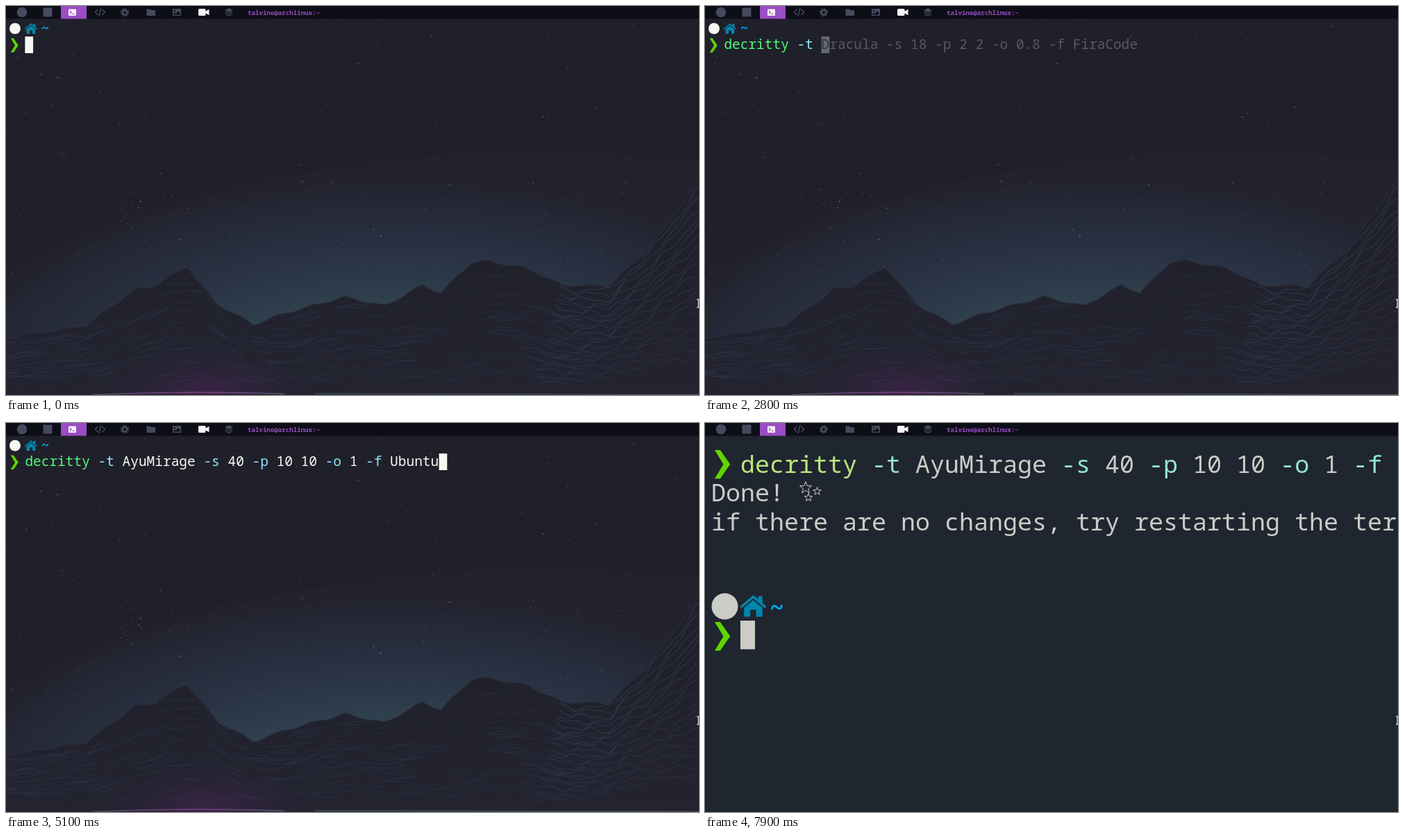
Write an HTML page with a canvas that moves like this. It is 998 by 561 pixels and loops after 8 s.

```html
<!DOCTYPE html>
<html lang="en">
<head>
<meta charset="utf-8">
<title>Terminal theme</title>
<style>
  html, body { margin: 0; width: 100%; height: 100%; overflow: hidden; background: #20202a; }
  canvas, svg { position: absolute; left: 0; top: 0; width: 998px; height: 561px; }
  text { white-space: pre; }
</style>
</head>
<body>
<canvas id="sky" width="998" height="561"></canvas>
<svg viewBox="0 0 998 561">
  <defs>
    <path id="chevron" d="M0 0H3.9L11 10.2L3.9 20.4H0L6.2 10.2Z" fill="#5fd700"/>
    <path id="house" d="M0 8.3L9 .6L12.6 3.6V1.3H15.3V5.9L18 8.3L17 9.5L9 2.8L1 9.5ZM2.7 9.3L9 4L15.3 9.3V15.4H11V10.6H7V15.4H2.7Z" fill="#0087af"/>
  </defs>
  <g id="term"></g>
  <rect width="998" height="18.5" fill="#0d0e17"/>
  <rect x="79" width="37" height="18.5" fill="#9a4dc4"/>
  <g fill="#454b5d">
    <circle cx="23" cy="9" r="7.3"/>
    <rect x="53.5" y="2.5" width="13" height="13"/>
    <path d="M132.5 5L128.500 9L132.500 13M138.500 5L142.500 9L138.500 13M137 3L134 15" fill="none" stroke="#454b5d" stroke-width="1.5"/>
    <g fill="none" stroke="#454b5d">
      <circle cx="171" cy="9.2" r="3.3" stroke-width="2.6"/>
      <circle cx="171" cy="9.2" r="5.2" stroke-width="1.8" stroke-dasharray="2.1 1.984"/>
    </g>
    <path d="M203 4.5H207.5L209 6H215V14H202.5V5Z"/>
    <path fill-rule="evenodd" d="M240 4H252V14H240ZM241.5 12.5H250.5V10L248 7.500L244.500 11L243.300 9.800L241.500 11.300ZM242 6V8H244V6Z"/>
    <path d="M321 3L327 6L321 9L315 6Z"/>
    <path id="sheet" d="M315 8.7L316.7 8L321 10.2L325.3 8L327 8.7L321 11.7Z"/>
    <use href="#sheet" y="3.2"/>
  </g>
  <rect x="90" y="4.5" width="11" height="9.5" rx="1" fill="#f6f1f8"/>
  <path d="M92 7L94.2 9.2L92 11.4M95.5 11.4H98.5" fill="none" stroke="#9a4dc4" stroke-width="1.2"/>
  <path d="M278.500 4H286Q287.500 4 287.500 5.500V7.500L292.500 4.700V13.300L287.500 10.500V12.500Q287.500 14 286 14H278.500Q277 14 277 12.500V5.500Q277 4 278.500 4Z" fill="#f4f4f6"/>
  <g id="title"></g>
  <path d="M995 423Q997 423 997 425V433Q997 435 995 435M999 423Q997 423 997 425M997 433Q997 435 999 435" fill="none" stroke="#d4d4d8" stroke-width="1.3"/>
</svg>
<script>
const W = 998, H = 561, LOOP = 8000;
const g = document.getElementById('sky').getContext('2d');
const term = document.getElementById('term');
const title = document.getElementById('title');

let seed = 7;
const rand = () => (seed = (seed * 16807) % 2147483647) / 2147483647;

/* ---- wallpaper ---- */
const PEAKS = [
  [0, 478], [115, 460], [185, 408], [212, 404], [260, 375], [305, 430], [357, 459],
  [400, 443], [488, 419], [545, 432], [600, 402], [626, 413], [670, 369], [693, 367],
  [752, 378], [800, 402], [868, 403], [925, 350], [998, 250]
];

function ridge(x) {
  let i = 1;
  while (i < PEAKS.length - 1 && PEAKS[i][0] < x) i++;
  const [x0, y0] = PEAKS[i - 1], [x1, y1] = PEAKS[i];
  return y0 + (y1 - y0) * (x - x0) / (x1 - x0) + 1.5 * Math.sin(x / 8);
}

function trace(from, to, step, height) {
  const points = [];
  for (let x = from; x <= to; x += step) points.push([x, height(x)]);
  return points;
}

function stroke(color, width, points) {
  g.strokeStyle = color;
  g.lineWidth = width;
  g.beginPath();
  points.forEach(p => g.lineTo(...p));
  g.stroke();
}

// colours run evenly from the centre to the edge
function glow(x, y, rx, ry, colors) {
  const grad = g.createRadialGradient(0, 0, 0, 0, 0, 1);
  colors.forEach((color, i) => grad.addColorStop(i / (colors.length - 1), color));
  g.save();
  g.translate(x, y);
  g.scale(rx, ry);
  g.fillStyle = grad;
  g.beginPath();
  g.arc(0, 0, 1, 0, 7);
  g.fill();
  g.restore();
}

function stars(count, place, radius, alpha) {
  for (let i = 0; i < count; i++) {
    g.fillStyle = `rgba(135,138,158,${alpha * (.4 + rand() * .6)})`;
    g.beginPath();
    g.arc(...place(), radius * (.6 + rand() * .4), 0, 7);
    g.fill();
  }
}

function drawSky() {
  g.fillStyle = '#20202a';
  g.fillRect(0, 0, W, H);
  glow(760, 600, 850, 390, ['#22222d', '#22222c']);
  glow(560, 560, 700, 330, [
    'rgba(50,68,80,1)', 'rgba(49,66,78,1)', 'rgba(48,65,78,1)',
    'rgba(43,54,71,.9)', 'rgba(40,48,68,.55)', 'rgba(36,38,52,0)'
  ]);
  stars(430, () => [W * rand() ** 1.25, 20 + rand() * 400], 1, .36);
  stars(26, () => [172 + (rand() - .5) * 34, 292 + (rand() - .5) * 56], .9, .4);
  stars(30, () => [W * rand(), 40 + rand() * 300], 1.3, .55);
}

function drawHills() {
  const crest = trace(0, W, 2, ridge);
  g.save();
  g.beginPath();
  [[0, H], ...crest, [W, H]].forEach(p => g.lineTo(...p));
  const fill = g.createLinearGradient(0, 370, 0, H);
  fill.addColorStop(0, '#20212b');
  fill.addColorStop(1, '#232430');
  g.fillStyle = fill;
  g.fill();
  g.clip();
  stroke('rgba(58,62,82,.5)', 2, crest);

  // short streaks that follow the slope above them and flatten with depth
  for (let i = 0; i < 600; i++) {
    const x0 = rand() * 860 - 20, top = ridge(x0), depth = rand();
    const tilt = (ridge(x0 + 40) - ridge(x0 - 40)) / 80 * (1 - depth * .6);
    const y0 = top + 8 + depth * (535 - top), phase = rand() * 6;
    const line = trace(x0, x0 + 18 + rand() * 36, 3,
      x => y0 + tilt * (x - x0) + 1.5 * Math.sin(x / 9 + phase));
    stroke(`rgba(62,68,100,${.1 + rand() * .26})`, 1, line);
  }
  // terraces of the right-hand peak
  for (let k = 1; k < 20; k++) {
    const f = k / 20;
    const line = trace(800 - 40 * f, W + 4, 4, x =>
      ridge(x) * (1 - f) + (535 - 15 * Math.sin(x / 70)) * f +
      3 * Math.sin(x / 11 + k * 1.7) + 2 * Math.sin(x / 5 + k));
    stroke(`rgba(66,72,104,${.5 - f * .25})`, 1.2, line);
  }
  glow(290, 560, 150, 70, ['rgba(100,36,108,.38)', 'rgba(80,34,90,.18)', 'rgba(60,34,80,0)']);
  g.restore();

  const rim = g.createLinearGradient(125, 0, 405, 0);
  ['#4a4a5c', '#7d3d84', '#4b5565'].forEach((color, i) => rim.addColorStop(i / 2, color));
  stroke(rim, 1.6, trace(125, 403, 4, x => 557.3 + ((x - 280) / 85) ** 2));
  stroke('#414c5e', 1.5, [[445, 559], [W, 560.5]]);
}

/* ---- text ---- */
const MONO = "'Noto Sans Mono', 'DejaVu Sans Mono', monospace";

function face(advance) {
  g.font = `100px ${MONO}`;
  return { advance, size: advance / g.measureText('0').width * 100 };
}
const code = face(11.69), large = face(21), small = face(5.48);

const span = (s, color, bold) => `<tspan fill="${color}"${bold ? ' font-weight="700"' : ''}>${s}</tspan>`;
const text = (font, x, y, inner) =>
  `<text xml:space="preserve" x="${x}" y="${y}" font-family="${MONO}" font-size="${font.size}">${inner}</text>`;
const use = (id, x, y, scale = 1) => `<use href="#${id}" transform="translate(${x} ${y}) scale(${scale})"/>`;
const box = (x, y, w, h, color) => `<rect x="${x}" y="${y}" width="${w}" height="${h}" fill="${color}"/>`;
const disc = (x, y, r, color) => `<circle cx="${x}" cy="${y}" r="${r}" fill="${color}"/>`;

const DARK = { ok: '#50fa7b', bad: '#ff5555', flag: '#8be9fd', word: '#f8f8f2' };
const MIRAGE = { ok: '#bae67e', flag: '#95e6cb', word: '#cbccc6' };
const HINT = '#565864';

function paint(command, theme, known = true) {
  return (command.match(/\S+\s*/g) || []).map((part, i) => {
    if (!i) return span(part, known ? theme.ok : theme.bad, !known);
    return span(part, part[0] === '-' ? theme.flag : theme.word);
  }).join('');
}

function star(cx, cy, r) {
  const points = Array.from({ length: 10 }, (_, i) => {
    const a = i * Math.PI / 5 - Math.PI / 2, q = i % 2 ? r * .42 : r;
    return `${cx + q * Math.cos(a)},${cy + q * Math.sin(a)}`;
  });
  return `<polygon points="${points.join(' ')}" fill="none" stroke="#cbccc6"/>`;
}

/* ---- scenes ---- */
const FIRST = 'decritty -t Dracula -s 18 -p 2 2 -o 0.8 -f FiraCode';
const NEXT = 'decritty -t AyuMirage -s 40 -p 10 10 -o 1 -f Ubuntu';
const HOST = 'talvino@archlinux:~';

function typing(count) {
  const full = count > 12 ? NEXT : FIRST;
  const hint = count > 0 && count < full.length;
  const rest = hint ? span(full[count], '#343642') + span(full.slice(count + 1), HINT) : '';
  return disc(13, 32.5, 8, DARK.word) + use('house', 27, 24.5) +
    text(code, 50.8, 38.5, span('~', '#00afff', true)) + use('chevron', 6.8, 46.6) +
    box(27.4 + count * code.advance, 44, 11.7, 24, hint ? '#656773' : DARK.word) +
    text(code, 27.4, 62, paint(full.slice(0, count), DARK, count > 7) + rest);
}

const running = () => use('chevron', 6.8, 22.8) + text(code, 27.4, 38.5, paint(NEXT, DARK)) +
  box(4, 44, 11.7, 24, DARK.word);

function restyled() {
  const say = (y, s) => text(large, 9, y, span(s, MIRAGE.word));
  return box(0, 18, W, H, '#1f2630') +
    use('chevron', 14, 39, 2.02) + text(large, 51, 72, paint(NEXT, MIRAGE)) +
    say(113.3, 'Done!') + star(145, 93.5, 9) + star(161.5, 98.5, 6) + star(149, 107.5, 6) +
    say(154.7, 'if there are no changes, try restarting the ter') +
    disc(28.5, 264.5, 19, MIRAGE.word) + use('house', 50.5, 247, 2.1) +
    text(large, 93, 279, span('~', '#00afff', true)) +
    use('chevron', 14, 287, 2.02) + box(51, 285, 21, 41.3, MIRAGE.word);
}

// bursts of keys at an even pace, then the suggestion is accepted
const BURSTS = [
  { start: 700, gap: 150, keys: 8 },
  { start: 1900, gap: 300, keys: 4 },
  { start: 3200, gap: 400, keys: 3 }
];
const ACCEPT = 4700, RUN = 6100, RESTYLE = 6300;

function typed(t) {
  if (t >= ACCEPT) return NEXT.length;
  return BURSTS.reduce((sum, { start, gap, keys }) =>
    sum + Math.max(0, Math.min(keys, Math.floor((t - start) / gap) + 1)), 0);
}

let shown;
function frame() {
  const t = performance.now() % LOOP;
  const scene = t >= RESTYLE ? restyled : t >= RUN ? running : typed(t);
  if (scene !== shown) {
    shown = scene;
    term.innerHTML = typeof scene === 'number' ? typing(scene) : scene();
    title.innerHTML = text(small, 348, 13, span(scene === running ? NEXT : HOST, '#984fc2', true));
  }
  requestAnimationFrame(frame);
}

drawSky();
drawHills();
frame();
</script>
</body>
</html>
```
